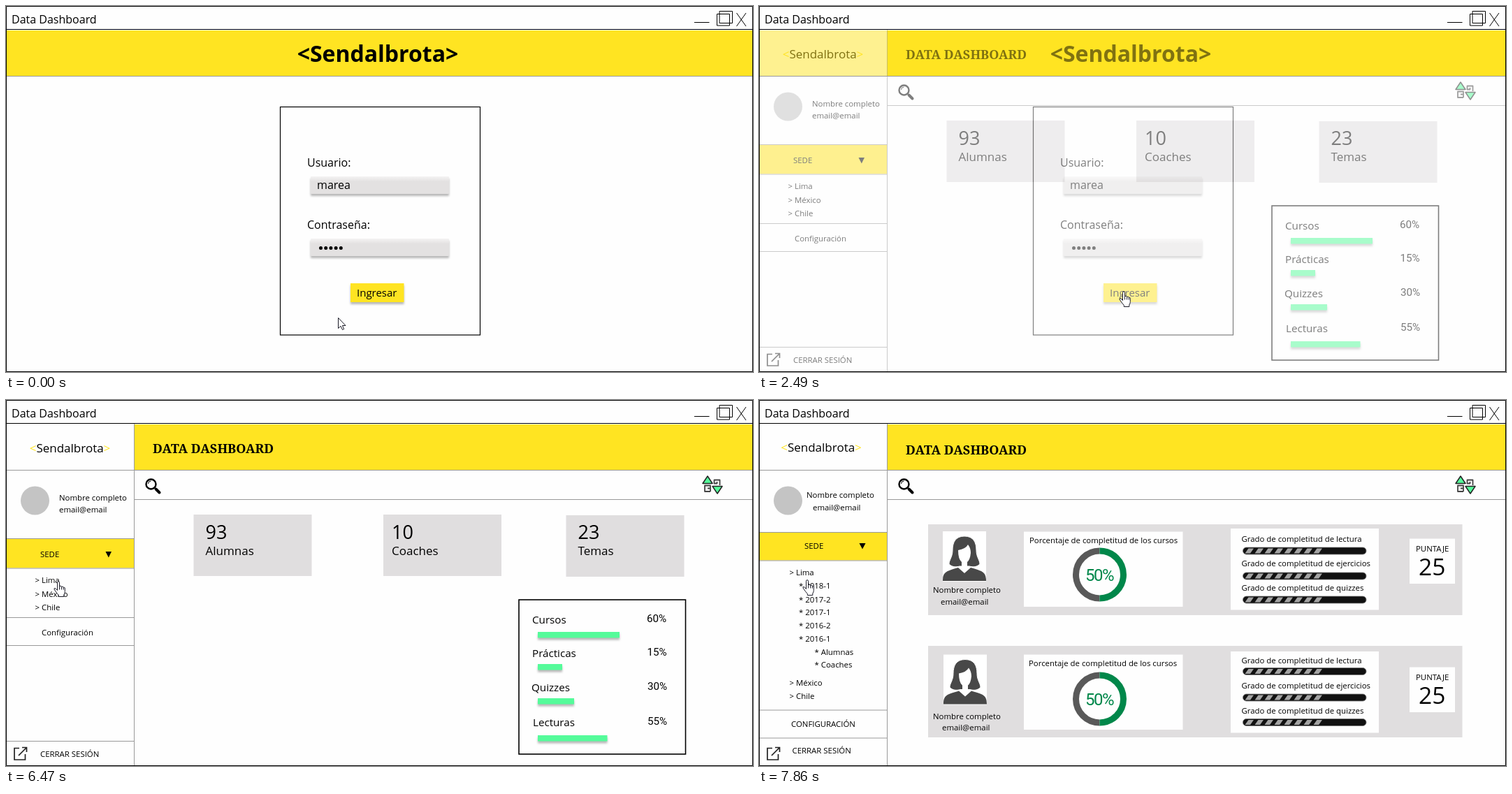
These frames come from a looping animation (1069x524 px, 8 s). An HTML page:

```html
<!DOCTYPE html>
<html lang="es">
<head>
<meta charset="utf-8">
<title>Data Dashboard</title>
<style>
html, body { margin: 0; width: 100%; height: 100%; overflow: hidden; background: #fefefe; }
svg { display: block; width: 1069px; height: 524px; font-family: "Open Sans", "Noto Sans", sans-serif; }
text { white-space: pre; }
.shadow { filter: drop-shadow(0 3px 1.5px rgba(0, 0, 0, .28)); }
.serif { font-family: "Noto Serif", serif; font-weight: 700; }
.roboto { font-family: Roboto, sans-serif; }
</style>
</head>
<body>
<svg id="stage" viewBox="0 0 1069 524"></svg>
<script>
const YELLOW = '#ffe422', GREY = '#e0dedf', GREEN = '#55fb9a', BRAND = 'Sendalbrota';
const SMALL = 11.4;

const text = (x, y, s, size = SMALL, attrs = '') =>
  `<text x="${x}" y="${y}" font-size="${size}" ${attrs}>${s}</text>`;
const rect = (x, y, w, h, fill, attrs = '') =>
  `<rect x="${x}" y="${y}" width="${w}" height="${h}" fill="${fill}" ${attrs}/>`;
const line = (d, color = '#000', width = 1, attrs = '') =>
  `<path d="${d}" fill="none" stroke="${color}" stroke-width="${width}" ${attrs}/>`;
const list = (x, rows) => rows.map(([y, s]) => text(x, y, s)).join('');

const field = y => rect(436, y, 198, 25, 'url(#field)', 'rx="1" class="shadow"');

const login = () =>
  rect(0, 34, 1069, 490, '#fefefe') +
  rect(0, 35, 1069, 65, YELLOW) + line('M0 100.5H1069', '#999') +
  text(532, 80, `&lt;${BRAND}&gt;`, 32, 'font-weight="700" text-anchor="middle"') +
  rect(392.5, 144.5, 286, 326.5, 'none', 'stroke="#000" stroke-width="1.2"') +
  text(431, 230, 'Usuario:', 16) + field(244) + text(445, 262, 'marea', 16) +
  text(431, 319, 'Contraseña:', 16) + field(333) +
  line('M450.5 346.5h29.5', '#000', 5, 'stroke-dasharray="0 7.2" stroke-linecap="round"') +
  rect(493, 397, 76.5, 27, YELLOW, 'class="shadow"') + text(502, 416, 'Ingresar', 15);

// Parts shared by both dashboard pages
const shell = (brandX, brandY, titleY, dividers, sedeY, sedeH) =>
  rect(0, 34, 1069, 490, '#fefefe') +
  rect(184, 35, 885, 65, YELLOW) +
  rect(1, sedeY, 182, sedeH, YELLOW) +
  line('M0 100.5H1069M184 142.5H1069M183.5 34V524', '#999') +
  line(dividers.map(y => `M0 ${y}H184`).join(''), '#999') +
  text(brandX, brandY, `<tspan fill="${YELLOW}">&lt;</tspan>${BRAND}<tspan fill="${YELLOW}">&gt;</tspan>`, 17, 'text-anchor="middle"') +
  text(210, titleY, 'DATA DASHBOARD', 18, 'class="serif"') +
  '<circle cx="41.5" cy="144" r="20.5" fill="#c4c4c4"/>' +
  '<circle cx="207.5" cy="120.5" r="7" fill="none" stroke="#000" stroke-width="2.4"/>' +
  line('M213 126l2.5 2.5', '#000', 2) + line('M214.5 127.5l5 5', '#000', 4, 'stroke-linecap="round"') +
  line('M203.5 120a4 4 0 0 1 4-4', '#000', 1) +
  line('M1021.5 122V114.5H1013.5V119.5H1018M1008 131H1000V122.5H1008V131M1004 126.5h4M1017.5 117v3', '#444', 1.8, 'stroke-linejoin="round"') +
  `<path d="M997 119.5L1004 109 1011 119.5ZM1011 123.500H1025L1018 134Z" fill="${GREEN}" stroke="#222" stroke-width="1.5" stroke-linejoin="round"/>` +
  line('M19 498.500H12V515H27.500V507M23 497.500H29.500V504M29.500 497.500L18 509', '#222', 1.7);

const stat = (x, y, n, label, tx) =>
  rect(x, y, 169, 88, GREY) + text(tx, 199, n, 27) + text(tx, 222, label, 17);
const meter = (x, y, label, pct, px, barY, w) =>
  text(x, y, label, 15.2) + text(px, y - 2, pct + '%', 15.2, 'class="roboto"') +
  rect(761, barY, w, 8.5, GREEN, 'class="shadow"');

const overview = () =>
  shell(91.5, 75, 76, [198.5, 241, 311.5, 351.5, 488.5], 199, 41.5) +
  list(76, [[144, 'Nombre completo'], [161, 'email@email']]) +
  text(49, 225, 'SEDE') + '<path d="M142.500 217h8.500l-4.200 8.500z"/>' +
  list(41.5, [[262, '&gt; Lima'], [282, '&gt; México'], [301, '&gt; Chile']]) +
  text(51, 337, 'Configuración') + text(49, 511, 'CERRAR SESIÓN') +
  stat(268.5, 164, 93, 'Alumnas', 285.5) +
  stat(540, 164, 10, 'Coaches', 552) +
  stat(801.5, 165, 23, 'Temas', 818.5) +
  rect(734, 286, 238.5, 221, 'none', 'stroke="#000" stroke-width="1.6"') +
  meter(753, 320, 'Cursos', 60, 917, 332, 117) +
  meter(753, 368, 'Prácticas', 15, 917.5, 378, 35) +
  meter(752, 417, 'Quizzes', 30, 918, 427, 52) +
  meter(754, 467, 'Lecturas', 55, 918, 480, 99.5);

const portrait = (x, y) => `<g transform="translate(${x} ${y})" fill="#484848">
  <rect width="62" height="72" fill="#fff"/>
  <path d="M0 71C0 58 5 57 22 52L31 60 40 52C57 57 62 58 62 71Z"/>
  <path d="M31 7C18 7 14 16 14 27 14 37 9 41 9 47 14 52 20 51 24 50H38C42 51 48 52 53 47 53 41 48 37 48 27 48 16 44 7 31 7Z" stroke="#fff"/>
  <path d="M22 27Q33 25 36 19 40 24 40 31 39 41 35 44V51L31 57 27 51V44Q22 40 22 27Z" fill="#fff"/></g>`;

const donut = y =>
  line(`M487.500 ${y - 34}a34 34 0 0 0 0 68`, '#595959', 9) +
  line(`M487.500 ${y - 34}a34 34 0 0 1 0 68`, '#00874a', 9) +
  text(487, y + 9, '50%', 24, 'class="roboto" letter-spacing="-1.5" text-anchor="middle" fill="#00874a"');

const progress = y =>
  rect(692.5, y - 5, 176.5, 10, '#111', 'rx="5" stroke="#777" stroke-width=".8"') +
  `<g transform="translate(697 ${y}) skewX(-35)">${line('M1 0H107', '#a3a3a3', 7, 'stroke-dasharray="7.500 6.500"')}</g>`;

// One student row; the offsets differ slightly between the two rows
const student = ({ top, h, face, name, course, ring, box, grades, score }) =>
  rect(242, top, 764.5, h, GREY) + portrait(...face) +
  text(249, name[0], 'Nombre completo') + text(name[1], name[2], 'email@email') +
  rect(379, course[0], 227.5, 107.5, '#fefefe') +
  text(course[1], course[2], 'Porcentaje de completitud de los cursos') + donut(ring) +
  rect(675, box, 212, 116.5, '#fefefe') +
  ['lectura', 'ejercicios', 'quizzes'].map((s, i) =>
    text(690.5, grades[i][0], 'Grado de completitud de ' + s) + progress(grades[i][1])).join('') +
  rect(931, score, 65, 64.5, '#fefefe') +
  text(940, score + 18, 'PUNTAJE') + text(944, score + 52, '25', 33.5);

const students = () =>
  shell(89, 74, 78, [189.5, 230, 444, 484], 190, 39.5) +
  text(68, 140, 'Nombre completo') + text(77, 158, 'email@email') +
  text(65, 213, 'SEDE') + '<path d="M143.500 205h9l-4.500 8.500z"/>' +
  list(43.5, [[250.5, '&gt; Lima'], [409, '&gt; México'], [428, '&gt; Chile']]) +
  list(57, [[270, '* 2018-1'], [290, '* 2017-2'], [308, '* 2017-1'], [327, '* 2016-2'], [345.5, '* 2016-1']]) +
  list(79.5, [[365, '* Alumnas'], [383, '* Coaches']]) +
  text(46, 468, 'CONFIGURACIÓN') + text(47.5, 506, 'CERRAR SESIÓN') +
  student({ top: 178, h: 130, face: [263, 188], name: [275.5, 260, 293], course: [188.5, 387, 205],
    ring: 250, box: 184, grades: [[203, 216], [237.5, 252], [273, 286]], score: 198.5 }) +
  student({ top: 352, h: 131, face: [264, 364.5], name: [457, 262, 472.5], course: [364.5, 386, 381],
    ring: 428, box: 360, grades: [[377, 388.5], [413, 426], [449, 461.5]], score: 382.5 });

const frame = () =>
  rect(0, 0, 1069, 34, '#fefefe') +
  line('M.5.5H1068.500V523.500H.5ZM0 33.500H1069') +
  text(8, 24.5, 'Data Dashboard', 16) +
  line('M985 23.500H1006.500M1017.500 11.500H1035.500V28H1017.500ZM1021 7.500H1039.500V24.500H1021ZM1045.500 10L1059 29M1059 10L1045.500 29');

const stage = document.getElementById('stage');
stage.innerHTML = `<defs><linearGradient id="field" x2="0" y2="1">
  <stop stop-color="#f4f3f3"/><stop offset=".3" stop-color="#e3e1e1"/></linearGradient></defs>
  ${login()}<g id="overview">${overview()}</g><g id="students">${students()}</g>${frame()}
  <g id="cursor" fill="#fff" stroke="#1c1c28" stroke-linejoin="round">
    <path id="arrow" d="M.5.5V15.500L4 12.300 6.500 17.500 8.700 16.500 6.400 11.500H11Z"/>
    <g id="hand" transform="translate(-6 0)">
      <path d="M5.500 13.500V2.300Q5.500.7 7 .7T8.500 2.300V8.500Q8.700 7.200 10 7.200T11.600 8.800Q12 8 13 8T14.300 9.600Q15 9 15.700 9.300T16.300 11V15.500Q16.300 18 14.800 20V22.500H7.300V20.300Q5 18 3 15L1 12Q.5 10.500 2 10.500 3 10.400 5.500 13.500Z"/>
      <path d="M8.500 8.500v4M11.600 8.800v3.700M14.300 9.600v3" fill="none"/>
    </g>
  </g>`;

const STEP = 120;
// Pointer moves: start time, number of steps, destination
const moves = [
  [150, 3, 483, 439], [540, 1, 484, 440], [1070, 1, 488, 434], [1220, 4, 517, 413],
  [1730, 2, 521, 408], [4140, 1, 482, 402], [4260, 4, 322, 350], [5050, 2, 248, 325],
  [5320, 3, 159, 287], [5710, 2, 123, 270], [6080, 1, 119, 271], [6230, 3, 74, 259],
  [6620, 1, 68, 259], [6770, 1, 68, 258], [7460, 1, 68, 257]
];

function pointer(t) {
  let x = 475, y = 446;
  for (const [start, steps, toX, toY] of moves) {
    if (t < start) break;
    const p = Math.min(1, (1 + Math.floor((t - start) / STEP)) / steps);
    x += (toX - x) * p;
    y += (toY - y) * p;
  }
  return [Math.round(x), Math.round(y)];
}

// Dissolves advance in held steps
const dissolve = (t, start, mid, end, a, b) => t < start ? 0 : t < mid ? a : t < end ? b : 1;

const el = id => document.getElementById(id);
const show = (id, on) => el(id).setAttribute('visibility', on ? 'visible' : 'hidden');

function draw() {
  const t = performance.now() % 8000;
  el('overview').setAttribute('opacity', dissolve(t, 2370, 2490, 2610, .1, .5));
  el('students').setAttribute('opacity', dissolve(t, 7190, 7310, 7460, .13, .57));
  const hand = t >= 1340 && t < 4140 || t >= 6470;
  show('hand', hand);
  show('arrow', !hand);
  el('cursor').setAttribute('transform', `translate(${pointer(t)})`);
  requestAnimationFrame(draw);
}
draw();
</script>
</body>
</html>
```
